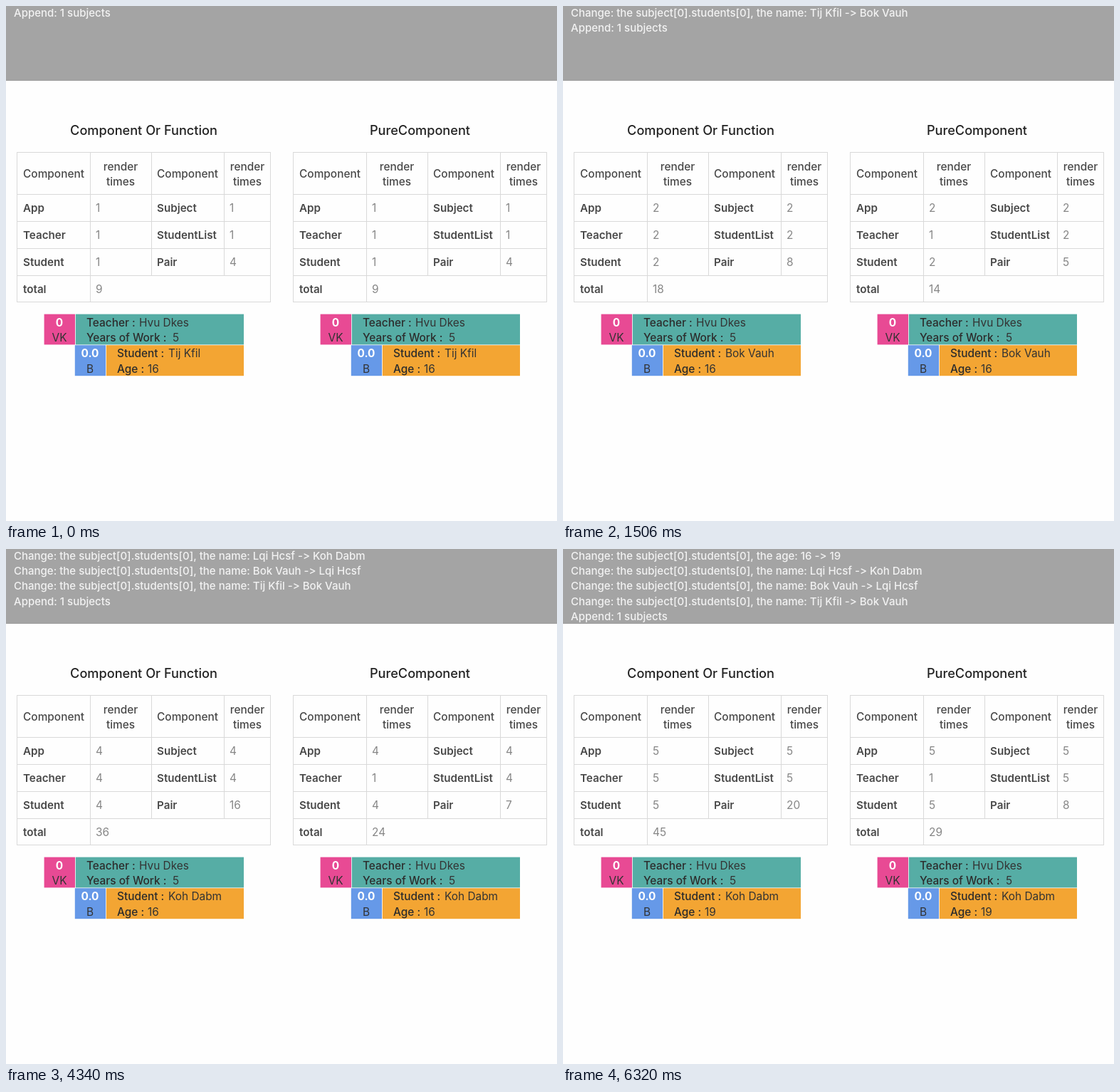
These frames come from a looping animation (774 px wide and 723 px high, 8000 ms). An HTML page:

```html
<!DOCTYPE html>
<html lang="en">
<head>
<meta charset="utf-8">
<title>Render times</title>
<style>
  html, body { margin: 0; width: 100%; height: 100%; overflow: hidden; background: #fefefe; }
  svg { display: block; width: 774px; height: 723px; }
  text {
    font: 400 15.4px Inter, "Noto Sans", sans-serif;
    font-feature-settings: "calt" 0;
    fill: #333;
  }
  .log text { font-size: 15px; font-weight: 500; fill: #f2f2f2; }
  .title { font-size: 18.15px; font-weight: 500; fill: #222; }
  .head { font-weight: 500; fill: #484848; }
  .name { font-size: 15.2px; font-weight: 600; fill: #484848; }
  .count { fill: #868686; }
  .label { font-weight: 500; fill: #2c2c2c; }
  .index { font-weight: 700; fill: #fff; }
  .mid { text-anchor: middle; }
  .grid { fill: none; stroke: #d9d9d9; shape-rendering: crispEdges; }
</style>
</head>
<body>
<svg id="stage" viewBox="0 0 774 723"></svg>
<script>
const stage = document.getElementById('stage');
const LOOP = 8000;
const CUTS = [360, 2270, 4340, 6320];
const TEACHER = 'Hvu Dkes';
const STUDENTS = ['Tij Kfil', 'Bok Vauh', 'Lqi Hcsf', 'Koh Dabm'];

// y is the middle of the capital letters
const text = (x, y, str, cls = '') =>
  `<text x="${x}" y="${y + 5.5}" class="${cls}">${String(str).replace(/>/g, '&gt;')}</text>`;
const rect = (x, y, w, h, fill) =>
  `<rect x="${x}" y="${y}" width="${w}" height="${h}" fill="${fill}"/>`;

const change = (key, from, to) =>
  `Change: the subject[0].students[0], the ${key}: ${from} -> ${to}`;

const messages = [
  'Append: 1 subjects',
  ...STUDENTS.slice(1).map((name, i) => change('name', STUDENTS[i], name)),
  change('age', 16, 19)
];

function log(step) {
  const lines = messages.slice(0, step + 1).reverse();
  return rect(0, 0, 774, 105, '#a4a4a4') + rect(0, 104, 774, 1, '#9e9e9e') + '<g class="log">' +
    lines.map((line, i) => text(11, 9.3 + i * 21.33, line)).join('') + '</g>';
}

function table(n, pure) {
  const rows = [
    ['App', n, 'Subject', n],
    ['Teacher', pure ? 1 : n, 'StudentList', n],
    ['Student', n, 'Pair', pure ? n + 3 : n * 4]
  ];
  const total = pure ? n * 5 + 4 : n * 9;
  const lines = [264.5, 302.5, 340.5, 378.5].map(y => `M15 ${y}H372`).join('') +
    'M118.5 205V416M204.5 205V378M306.5 205V378';

  let out = `<path class="grid" d="M15.5 205.5H371.5V415.5H15.5Z${lines}"/>`;
  for (const x of [67, 255]) out += text(x, 235.5, 'Component', 'head mid');
  for (const x of [161, 339]) {
    out += text(x, 225, 'render', 'head mid') + text(x, 246, 'times', 'head mid');
  }
  rows.forEach((row, r) => row.forEach((cell, c) => {
    out += text([24, 126, 212, 314][c], 283.8 + r * 37.8, cell, c % 2 ? 'count' : 'name');
  }));
  return out + text(24, 397.3, 'total', 'name') + text(126, 397.3, total, 'count');
}

function cards(step) {
  const name = STUDENTS[Math.min(step, 3)];
  const age = step < 4 ? 16 : 19;
  return rect(53.6, 432.6, 43.4, 42.8, '#e84a94') + rect(97.8, 432.6, 236.2, 42.8, '#56ada5') +
    rect(96.8, 476.2, 43.2, 43, '#6699e8') + rect(140.8, 476.2, 193.2, 43, '#f3a533') +
    text(75, 444, '0', 'index mid') + text(75, 465.3, 'VK', 'mid') +
    text(113, 444, 'Teacher :', 'label') + text(187, 444, TEACHER) +
    text(113, 465.3, 'Years of Work :', 'label') + text(234, 465.3, 5) +
    text(118, 487.7, '0.0', 'index mid') + text(118, 509, 'B', 'mid') +
    text(156, 487.7, 'Student :', 'label') + text(228, 487.7, name) +
    text(156, 509, 'Age :', 'label') + text(199, 509, age);
}

const panel = (x, title, step, pure) =>
  `<g transform="translate(${x})">` + text(193.5, 175.5, title, 'title mid') +
  table(step + 1, pure) + cards(step) + '</g>';

let shown = -1;
function draw(step) {
  if (step === shown) return;
  shown = step;
  stage.innerHTML = log(step) +
    panel(0, 'Component Or Function', step, false) +
    panel(388, 'PureComponent', step, true);
}

const start = performance.now();
function tick() {
  const t = (performance.now() - start) % LOOP;
  draw(CUTS.filter(cut => t >= cut).length);
  requestAnimationFrame(tick);
}
tick();
</script>
</body>
</html>
```
